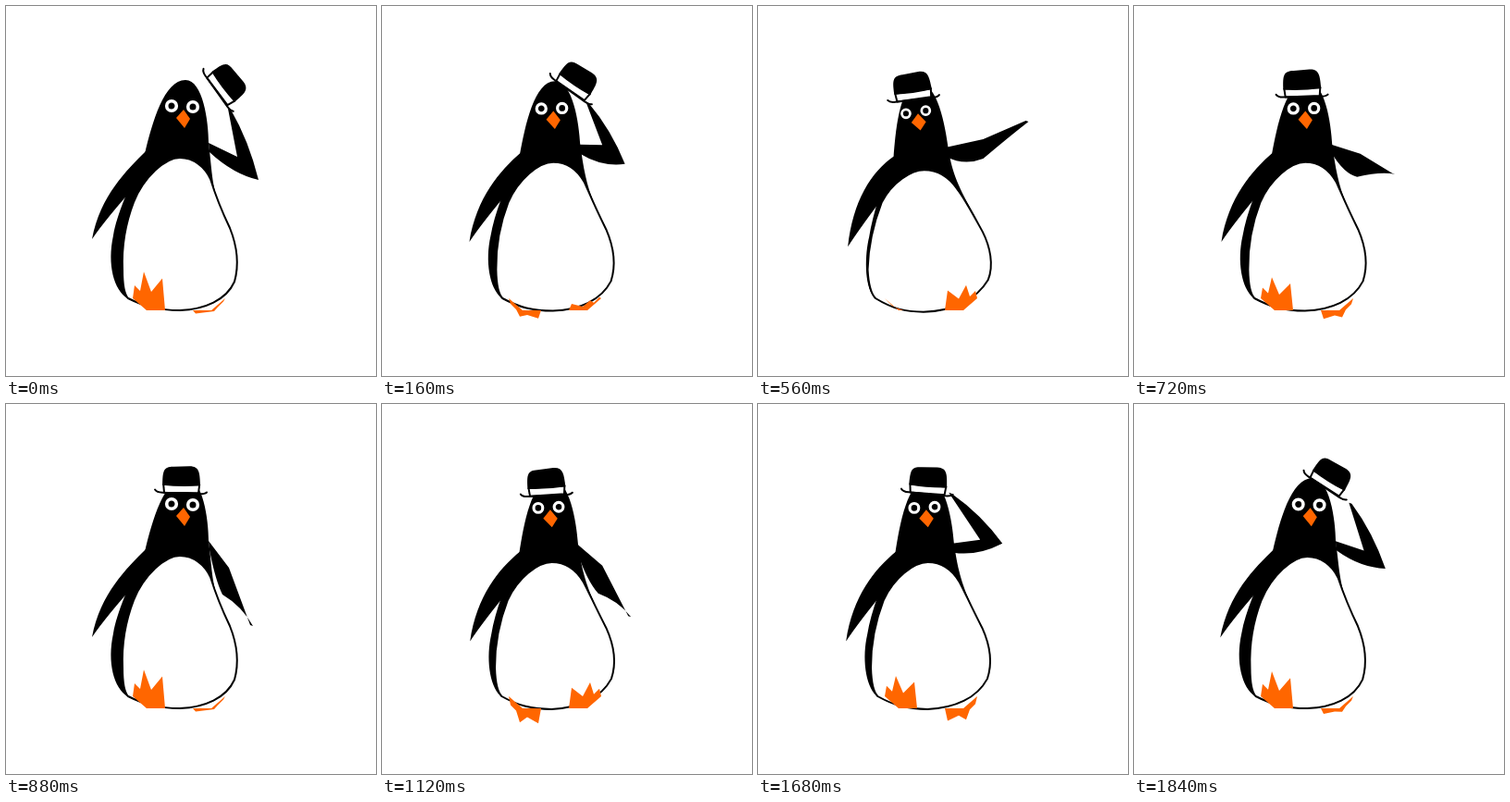
These frames come from a looping animation (400x400 px, 1920 ms). An HTML page:

```html
<!DOCTYPE html>
<html lang="en">
<head>
<meta charset="utf-8">
<title>Penguin tipping its hat</title>
<style>
  html, body { margin: 0; width: 100%; height: 100%; overflow: hidden; background: #fff; }
  svg { display: block; width: 100vw; height: 100vh; }
  .line { stroke: #000; stroke-width: 2; stroke-linejoin: round; stroke-linecap: round; }
</style>
</head>
<body>
<svg viewBox="0 0 400 400">
  <path id="body"/>
  <path id="leftArm"/>
  <path id="belly" class="line" fill="#fff"/>
  <path id="rightArm"/>
  <g fill="#f60">
    <path id="leftFoot"/>
    <path id="rightFoot"/>
    <path id="beak"/>
  </g>
  <path id="eyes" fill="none" stroke="#fff"/>
  <g id="hat" class="line">
    <path fill="#fff" d="M-19 -9H20L19 0H-18Z"/>
    <path stroke="none" d="M-20 -8C-20 -24 -19 -28 -8 -28L9 -29C20 -29 20 -22 21 -8Q0 -6 -20 -8Z"/>
    <path fill="none" d="M-28 -3Q-26 0 -20 0L20 1Q26 1 28 -1"/>
  </g>
</svg>
<script>
const STEP = 80, STEPS = 24, FIRST_STRIDE = 11;
const $ = id => document.getElementById(id);
const lerp = (a, b, u) => a + (b - a) * u;

// Outlines at the two ends of the waddle: leaning left, leaning right.
const waddle = {
  body: [
    'M124 314C114 300 117 265 121 250C125 225 135 190 146 165C147 135 150 84 170 84C190 84 199 130 203 156C208 185 215 195 236 232Z',
    'M131 316C117 307 109 280 116 248C120 225 133 195 150 160C158 126 171 80 194 80C213 80 219 125 219 148C222 170 222 190 229 212Z'
  ],
  belly: [
    'M178 180C164 180 144 192 133 212C126 230 118 258 117 285C118 300 120 310 126 316C145 328 158 331 177 331C210 330 235 318 249 296C256 280 251 260 243 245C230 222 222 208 214 200C203 185 192 180 178 180Z',
    'M188 164C172 164 149 185 138 212C128 238 125 262 126 285C126 300 128 312 132 316C150 325 165 329 188 329C215 328 238 318 247 298C252 280 250 260 242 240C230 215 225 200 221 187C215 174 203 164 188 164Z'
  ],
  leftArm: [
    'M147 163C120 180 103 212 98 262Q112 240 140 202Z',
    'M152 156C130 178 102 205 93 252Q108 230 142 192Z'
  ],
  beak: [
    'M169 117L178 126L172 135L162 127Z',
    'M192 112L199 122L193 132L184 121Z'
  ]
};

// Right arm relative to the shoulder: inner elbow, elbow tip, hand.
const armPoses = [
  [0, 31, 15, 54, 40, 21, -37],   // hat held out
  [4, 19, -14, 45, 2, -6, -54],   // hat set down
  [7, 41, -9, 41, 12, 87, -29],   // stretched out
  [11, 22, 29, 15, 58, 45, 91],   // hanging
  [17, 34, 19, 32, 50, 67, 66],
  [21, 30, -4, 54, 0, -4, -55],   // reaching for the hat
  [24, 31, 15, 54, 40, 21, -37]
];

// Hat relative to its seat on the head: x, y, angle.
const hatPoses = [
  [0, 39, -4, 52], [4, 4, -9, 21], [7, 0, 0, 0],
  [20, 0, 0, 0], [23, 18, -7, 32], [24, 39, -4, 52]
];

// Toe height over one stride; below zero the toes hang under the belly.
const toeHeights = [[0, 40], [.14, 25], [.2, -20], [.36, -9], [.5, -4], [.64, 0], [.77, 33], [1, 40]];

function pose(keys, time) {
  const i = keys.findIndex(key => key[0] > time);
  const a = keys[i - 1], b = keys[i];
  const u = (time - a[0]) / (b[0] - a[0]);
  return a.map((v, k) => lerp(v, b[k], u * u * (3 - 2 * u))).slice(1);
}

function blendPath([from, to], u) {
  const ends = to.match(/[\d.]+/g);
  let i = 0;
  return from.replace(/[\d.]+/g, v => lerp(+v, +ends[i++], u).toFixed(2));
}

const ring = (x, y, r) => `M${x - r} ${y}a${r} ${r} 0 1 1 ${2 * r} 0a${r} ${r} 0 1 1 ${-2 * r} 0`;

// Three toes on a slanted sole; side mirrors the foot.
function foot(x, side, height) {
  const points = [
    [-17, -13], [-15, -11 - .4 * height], [-9, -5 - .4 * height],
    [-5, -3 - .97 * height], [3, -.5 * height], [15, -.86 * height],
    [18, 0], [-2, 0]
  ];
  return 'M' + points.map(([dx, dy]) => [x + side * dx, 329 + dy]).join('L') + 'Z';
}

function rightArm(x, y, [ix, iy, ex, ey, hx, hy]) {
  return `M${x} ${y}L${x + ix} ${y + iy}L${x + hx} ${y + hy}`
    + `L${x + hx + 3} ${y + hy + 1}Q${x + (hx + ex) / 2 + 6} ${y + (hy + ey) / 2 - 4} ${x + ex} ${y + ey}`
    + `Q${x + ex / 2} ${y + ey / 2 + 14} ${x + 1} ${y + 10}Z`;
}

function draw(step) {
  const stride = step < FIRST_STRIDE
    ? step / FIRST_STRIDE
    : (step - FIRST_STRIDE) / (STEPS - FIRST_STRIDE);
  const sway = (1 + Math.cos(2 * Math.PI * stride)) / 2;
  const shape = (id, d) => $(id).setAttribute('d', d);

  for (const id in waddle) shape(id, blendPath(waddle[id], sway));
  shape('rightArm', rightArm(lerp(199, 219, sway), lerp(154, 148, sway), pose(armPoses, step)));
  shape('leftFoot', foot(154, 1, pose(toeHeights, stride)[0]));
  shape('rightFoot', foot(220, -1, pose(toeHeights, (stride + .5) % 1)[0]));

  const radius = lerp(4.3, 5.3, sway);
  shape('eyes', ring(lerp(156, 179, sway), lerp(118, 108, sway), radius)
    + ring(lerp(177, 202, sway), lerp(114, 109, sway), radius));
  $('eyes').setAttribute('stroke-width', lerp(2.6, 3.6, sway));

  const [dx, dy, turn] = pose(hatPoses, step);
  const x = lerp(164, 189, sway) + dx, y = lerp(102, 96, sway) + dy;
  $('hat').setAttribute('transform', `translate(${x} ${y}) rotate(${lerp(-10, 1, sway) + turn})`);
}

function tick(now) {
  draw(Math.floor(now / STEP) % STEPS);
  requestAnimationFrame(tick);
}
draw(0);
requestAnimationFrame(tick);
</script>
</body>
</html>
```
